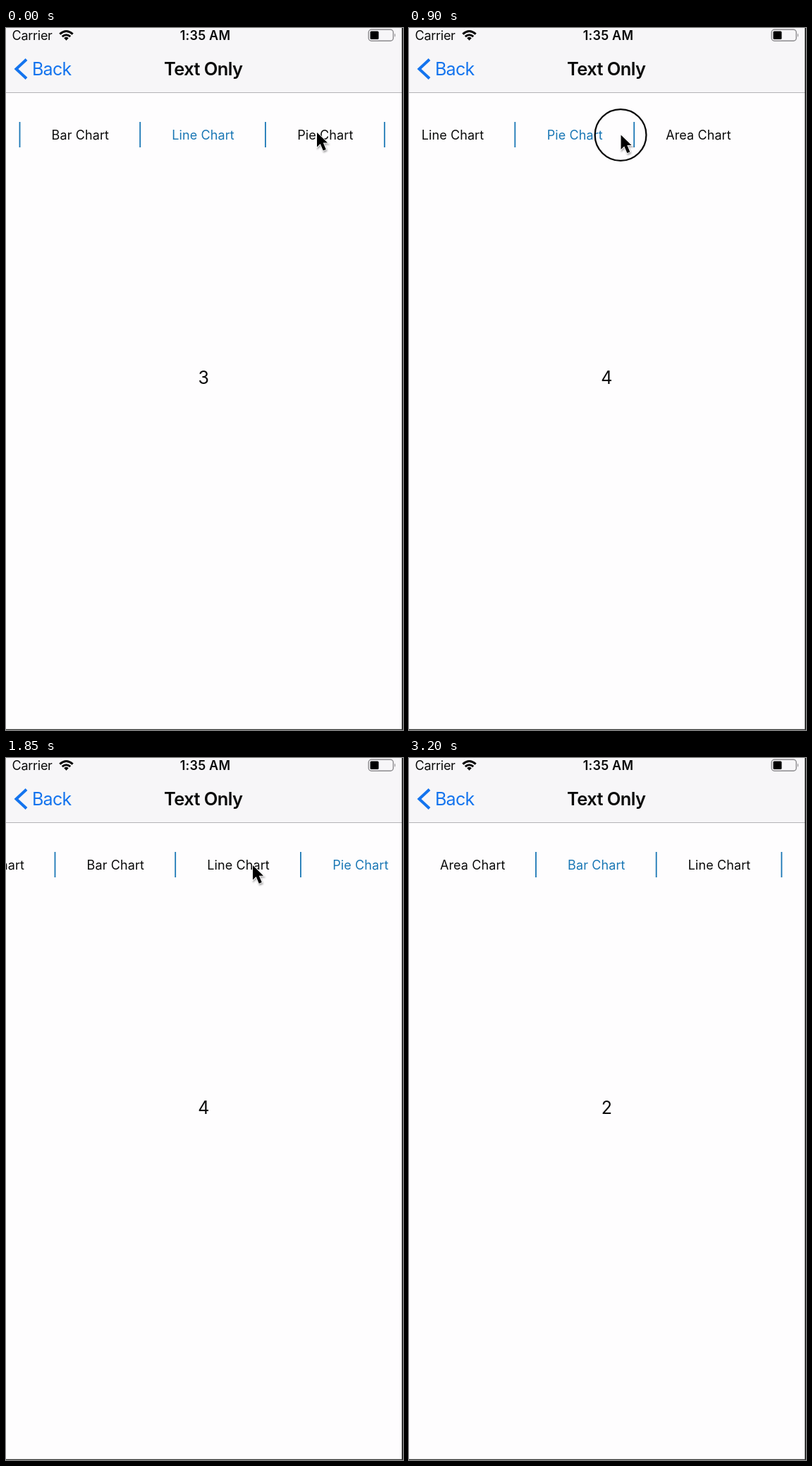
An HTML page for the animation above (3700 ms loop, 563 by 994 pixels).

```html
<!DOCTYPE html>
<html lang="en">
<head>
<meta charset="utf-8">
<title>Text Only</title>
<style>
  html, body { margin: 0; width: 100%; height: 100%; overflow: hidden; background: #fefdfe; }
  svg { display: block; width: 563px; height: 994px; }
  text { font-family: Inter, Roboto, sans-serif; font-size: 18px; fill: #0a0a0a; }
  .mid, #strip text { text-anchor: middle; }
  .time { font-weight: 600; letter-spacing: .2px; }
  .title { font-size: 25.5px; font-weight: 600; letter-spacing: -.6px; }
  .back { font-size: 25px; letter-spacing: -.75px; fill: #1474ee; }
  #count { font-size: 25px; }
  #strip text { letter-spacing: .1px; }
  #strip .on { fill: #1a77b5; }
  #strip line { stroke: #1a77b5; stroke-width: 1.8; }
</style>
</head>
<body>
<svg viewBox="0 0 563 994">
  <rect width="563" height="994" fill="#fefdfe"/>
  <rect width="563" height="91" fill="#f7f6f8"/>
  <rect y="91" width="563" height="1" fill="#b4b3b6"/>

  <text x="8.5" y="17" letter-spacing="-.25">Carrier</text>
  <g fill="none" stroke="#0a0a0a" stroke-width="3">
    <path d="M76.3 8.6Q85.5 .4 94.7 8.6M79.7 12.2Q85.5 7.2 91.3 12.2"/>
    <path d="M82.2 14.2Q85.5 11.4 88.8 14.2L85.5 17.8Z" fill="#0a0a0a" stroke="none"/>
  </g>
  <text class="mid time" x="282.5" y="17">1:35 AM</text>
  <rect x="514.2" y="2.2" width="35" height="16" rx="4" fill="none" stroke="#8b8a8d" stroke-width="1.4"/>
  <rect x="516.5" y="4.5" width="12" height="11.5" rx="1.5" fill="#000"/>
  <path d="M551 7.5Q553.4 10.2 551 13Z" fill="#8b8a8d"/>

  <path d="M29 44.5L14.5 58L29 71.5" fill="none" stroke="#1474ee" stroke-width="4"/>
  <text class="back" x="37" y="67">Back</text>
  <text class="mid title" x="279.8" y="67">Text Only</text>

  <g id="strip"></g>
  <text id="count" class="mid" x="280.3" y="504"></text>

  <rect x="561.4" width="1.6" height="994" fill="#111"/>
  <rect y="992.8" width="563" height="1.2" fill="#333"/>

  <g id="cursor">
    <circle id="press" cx="-.5" r="36.4" fill="none" stroke="#0a0a0a" stroke-width="2.3"/>
    <path id="arrow" d="M0 0V20.5L4.7 16L8.8 25.6L12.8 23.9L8.8 14.6H15Z" fill="#000" stroke="#fff" stroke-width="1.8" paint-order="stroke" style="filter: drop-shadow(1px 2px 1px #0005)"/>
  </g>
</svg>
<script>
const LOOP = 3700, TICK = 50;
const $ = id => document.getElementById(id);
const strip = $('strip'), count = $('count'), cursor = $('cursor'), press = $('press');

function add(name, attrs, content = '') {
  const el = document.createElementNS('http://www.w3.org/2000/svg', name);
  for (const key in attrs) el.setAttribute(key, attrs[key]);
  el.textContent = content;
  return strip.appendChild(el);
}

// tabs sit side by side, a divider before each but the first
const tabs = [['Area', 180.5], ['Bar', 170.7], ['Line', 177.7], ['Pie', 168.9], ['Area', 181.5]];
let left = 0;
const labels = tabs.map(([name, width]) => {
  if (left) add('line', { x1: left, x2: left, y1: 133, y2: 169 });
  const label = add('text', { x: left + width / 2 + .5, y: 157.5 }, name + ' Chart');
  left += width;
  return label;
});

const smooth = k => (1 - Math.cos(Math.PI * k)) / 2;
const settle = k => 1 - (1 - k) ** 3;

// moves one after the other: start time, end time, goal, easing
function follow(value, moves, t) {
  for (const [from, to, goal, ease = smooth] of moves) {
    const k = Math.min(1, Math.max(0, (t - from) / (to - from)));
    value += (goal - value) * ease(k);
  }
  return value;
}

const scroll = [
  [250, 550, -318.5],
  [650, 1000, -392.5],
  [1050, 1450, -318.5, settle],
  [1400, 1680, -111],
  [2200, 2500, -.5]
];
const pointerX = [[250, 600, 497], [650, 1000, 255], [1210, 1620, 467], [1700, 2050, 166], [2250, 2450, -40]];
const pointerY = [[250, 500, 151.5], [1700, 2050, 153], [2250, 2450, 100]];
const presses = [[100, 250], [600, 1050], [1350, 1700], [2050, 2200]];

function draw(now) {
  const time = now % LOOP, t = time - time % TICK;
  const chosen = t < 250 ? 2 : t < 2200 ? 3 : 1;
  const x = follow(441, pointerX, t), y = follow(148, pointerY, t);
  strip.setAttribute('transform', `translate(${follow(-161, scroll, t)} 0)`);
  labels.forEach((el, i) => el.classList.toggle('on', i === chosen));
  count.textContent = chosen + 1;
  cursor.setAttribute('transform', `translate(${x} ${y})`);
  press.style.display = presses.some(([from, to]) => t >= from && t < to) ? '' : 'none';
}

const start = performance.now();
function frame() {
  draw(performance.now() - start);
  requestAnimationFrame(frame);
}
frame();
</script>
</body>
</html>
```
